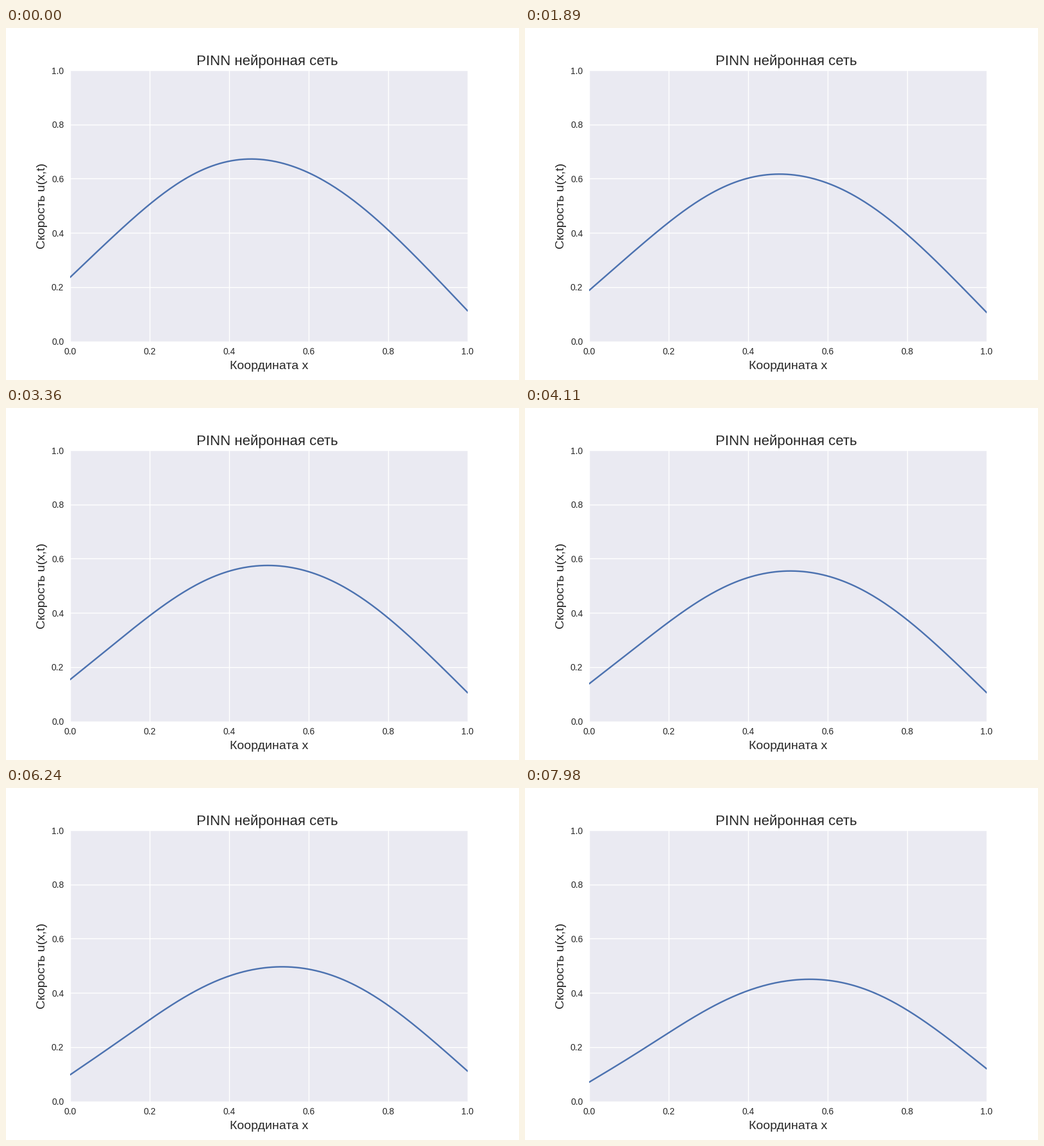
Animation of 800x550 px, one loop 8000 ms. Source, as a matplotlib script:

```python
import numpy as np
import matplotlib.pyplot as plt
from matplotlib.animation import FuncAnimation

LOOP_MS = 8000
FRAMES = 250

plt.rcParams.update({
    "font.family": "Liberation Sans",
    "text.color": "0.15",
    "axes.labelcolor": "0.15",
    "axes.facecolor": "#EAEAF2",
    "axes.linewidth": 0,
    "axes.grid": True,
    "axes.axisbelow": True,
    "grid.color": "white",
    "grid.linewidth": 1,
    "grid.linestyle": "-",
    "lines.linewidth": 1.75,
    "lines.solid_capstyle": "round",
    "xtick.color": "0.15",
    "ytick.color": "0.15",
    "xtick.major.size": 0,
    "ytick.major.size": 0,
    "xtick.major.pad": 7,
    "ytick.major.pad": 7,
})

X = np.linspace(0, 1, 200)


def drift(s, start, change, bow):
    """Move from start by change over s in 0..1, bowed in between."""
    return start + change * s + bow * s * (1 - s)


def wave(n):
    return np.sin(n * np.pi * X)


def profile(s):
    """A decaying hump: sloping base, main arch, skew and fixed overtones."""
    left = drift(s, 0.236, -0.166, -0.051)
    right = drift(s, 0.112, 0.008, -0.043)
    arch = drift(s, 0.4904, -0.1446, 0.053)
    skew = drift(s, 0.012, -0.0393, -0.022)
    base = left + (right - left) * X
    overtones = 0.0045 * wave(3) + 0.002 * wave(4) + 0.0015 * wave(5)
    return base + arch * wave(1) + skew * wave(2) - overtones


fig, ax = plt.subplots(figsize=(8, 5.5), dpi=100, facecolor="white")
fig.subplots_adjust(left=0.125, right=0.9, bottom=0.11, top=0.88)
ax.set(xlim=(0, 1), ylim=(0, 1))
# The trailing space sets the title slightly left of centre.
ax.set_title("PINN нейронная сеть ", fontsize=16)
ax.set_xlabel("Координата x", fontsize=14, labelpad=4.7)
ax.set_ylabel("Скорость u(x,t)", fontsize=14)
line, = ax.plot(X, profile(0), color="#4C72B0")


def update(frame):
    line.set_ydata(profile(frame / FRAMES))
    return line,


anim = FuncAnimation(fig, update, frames=FRAMES, interval=LOOP_MS // FRAMES,
                     repeat=True, repeat_delay=0)
plt.show()
```
